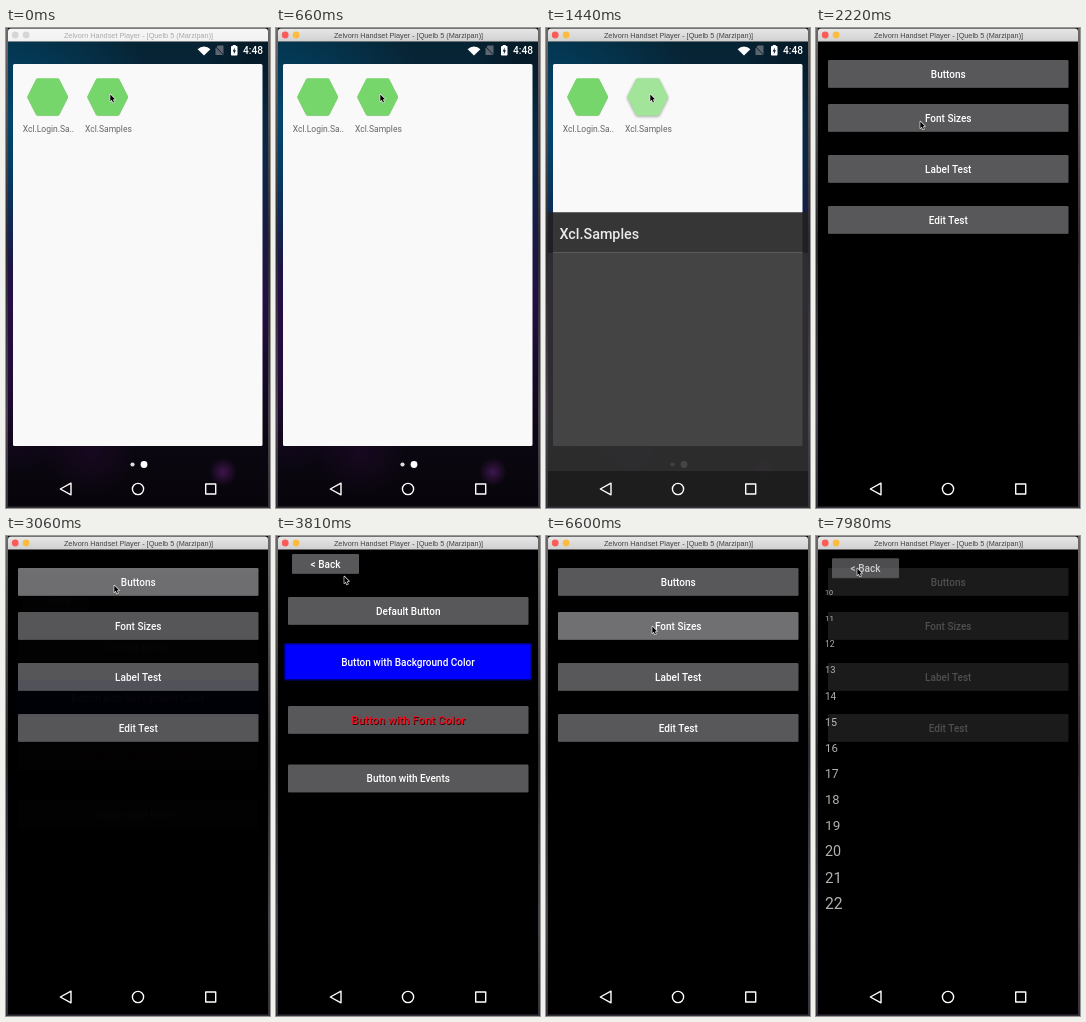
Animation of 264x480 px, one loop 8 s. Source, as an HTML page with a canvas:

```html
<!DOCTYPE html>
<html lang="en">
<head>
<meta charset="utf-8">
<title>App samples</title>
<style>
html, body { margin: 0; width: 100%; height: 100%; overflow: hidden; background: #000; }
canvas { display: block; width: 264px; height: 480px; }
</style>
</head>
<body>
<canvas id="stage"></canvas>
<script>
const LOOP = 8000, W = 264, H = 480;
const canvas = document.getElementById('stage');
const ratio = window.devicePixelRatio || 1;
canvas.width = W * ratio;
canvas.height = H * ratio;
const ctx = canvas.getContext('2d');
ctx.scale(ratio, ratio);

const clamp = v => Math.max(0, Math.min(1, v));
const progress = (t, start, duration) => clamp((t - start) / duration);
const easeOut = (p, power) => 1 - (1 - p) ** power;
const easeInOut = p => p * p * (3 - 2 * p);
const within = (t, start, end) => t >= start && t < end;

// Times of the main events
const FOCUS = 400, LAUNCH = 1378, APP_READY = 1880, ON_CLICK = 4560;
const presses = {
  icon: [1180, 1640], buttons: [2860, 3120], events: [4430, 4680],
  back: [5560, 5800], fonts: [6500, 6720], fontBack: [7700, 7990]
};
const visits = [
  { draw: drawButtonsPage, open: 3060, close: 5720 },
  { draw: drawFontsPage, open: 6640, close: 7835 }
];
// Pointer stops: time, x, y
const pointerPath = [
  [0, 104, 66], [1750, 104, 66], [2150, 104, 93], [2350, 104, 93], [2750, 108, 49],
  [3350, 108, 49], [3780, 68, 40], [3840, 68, 40], [4330, 108, 242], [4800, 108, 242],
  [5350, 53, 33], [5900, 53, 33], [6350, 106, 90], [6880, 106, 90], [7500, 41, 32], [8000, 41, 32]
];

function rect(x, y, w, h, fill, radius = 0) {
  ctx.fillStyle = fill;
  ctx.beginPath();
  ctx.roundRect(x, y, w, h, radius);
  ctx.fill();
}

function circle(x, y, r, fill) {
  ctx.fillStyle = fill;
  ctx.beginPath();
  ctx.arc(x, y, r, 0, Math.PI * 2);
  ctx.fill();
}

function polygon(points, fill) {
  ctx.beginPath();
  points.forEach(([x, y]) => ctx.lineTo(x, y));
  ctx.closePath();
  if (fill) {
    ctx.fillStyle = fill;
    ctx.fill();
  }
}

function text(label, x, y, size, { color = '#fff', weight = 500, align = 'center', family = 'Roboto' } = {}) {
  ctx.font = `${weight} ${size}px ${family}, sans-serif`;
  ctx.fillStyle = color;
  ctx.textAlign = align;
  ctx.textBaseline = 'alphabetic';
  ctx.fillText(label, x, y + size * 0.36);
}

function verticalGradient(top, bottom, stops) {
  const g = ctx.createLinearGradient(0, top, 0, bottom);
  stops.forEach(([at, color]) => g.addColorStop(at, color));
  return g;
}

function glow(x, y, r, rgb, alpha) {
  const g = ctx.createRadialGradient(x, y, 0, x, y, r);
  g.addColorStop(0, `rgba(${rgb},${alpha})`);
  g.addColorStop(1, `rgba(${rgb},0)`);
  ctx.fillStyle = g;
  ctx.fillRect(0, 0, W, H);
}

function layer(alpha, shift, draw) {
  ctx.save();
  ctx.globalAlpha = alpha;
  ctx.translate(0, shift);
  draw();
  ctx.restore();
}

function drawWallpaper() {
  ctx.fillStyle = verticalGradient(14, H, [
    [0, '#062433'], [0.25, '#0b2747'], [0.55, '#220f45'], [0.85, '#0b0712'], [1, '#07050a']
  ]);
  ctx.fillRect(0, 0, W, H);
  glow(0, 90, 150, '0,82,125', 0.75);
  glow(0, 340, 110, '50,12,80', 0.5);
  glow(250, 25, 60, '0,8,18', 0.4);
  glow(85, 425, 45, '55,12,68', 0.3);
  glow(217, 444, 14, '90,30,110', 0.65);
}

function drawStatusBar() {
  ctx.fillStyle = '#fff';
  ctx.beginPath();
  ctx.moveTo(198, 27.5);
  ctx.arc(198, 27.5, 9, -Math.PI * 0.75, -Math.PI * 0.25);
  ctx.fill();
  polygon([[209.5, 20], [212, 17.5], [217.5, 17.5], [217.5, 27], [209.5, 27]], '#5c6670');
  ctx.strokeStyle = '#15202a';
  ctx.lineWidth = 1;
  ctx.beginPath();
  ctx.moveTo(208.5, 17.5);
  ctx.lineTo(218, 27.5);
  ctx.stroke();
  rect(225, 18, 6.5, 9.5, '#fff', 0.8);
  rect(226.8, 17, 3, 2, '#fff');
  polygon([[228.8, 19.5], [226.6, 23.5], [228, 23.5], [227.8, 26.3], [230, 22.3], [228.6, 22.3]], '#102030');
  text('4:48', 257, 22.8, 10.2, { align: 'right' });
}

function drawIcon(x, label, pressed) {
  const color = pressed ? '#a2e49a' : '#77d66b';
  ctx.save();
  ctx.lineJoin = 'round';
  ctx.lineWidth = 3;
  ctx.strokeStyle = color;
  ctx.shadowColor = `rgba(0,0,0,${pressed ? 0.4 : 0.2})`;
  ctx.shadowBlur = (pressed ? 3 : 1) * ratio;
  ctx.shadowOffsetY = (pressed ? 1 : 0.5) * ratio;
  polygon([[-20, 0], [-11, -18], [11, -18], [20, 0], [11, 18], [-11, 18]]
    .map(([dx, dy]) => [x + dx * 0.94, 69 + dy * 0.94]));
  ctx.stroke();
  ctx.shadowColor = 'transparent';
  ctx.stroke();
  ctx.fillStyle = color;
  ctx.fill();
  ctx.restore();
  text(label, x + 0.7, 100.5, 8.5, { color: '#666', weight: 400 });
}

function drawLauncher(t) {
  drawWallpaper();
  drawStatusBar();
  rect(7, 36, 249.5, 382, '#f9f9f9', 1.5);
  drawIcon(41.7, 'Xcl.Login.Sa..', false);
  drawIcon(101.7, 'Xcl.Samples', within(t, ...presses.icon));
  circle(126.5, 436.5, 2.1, '#ddd');
  circle(138, 436.5, 3.4, '#fff');
}

function drawLaunchWindow(t) {
  const top = 443 - 411 * easeOut(progress(t, LAUNCH, 350), 5);
  const alpha = easeOut(progress(t, LAUNCH, 145), 4);
  layer(alpha, top, () => {
    rect(0, 0, W, 40.5, '#212121');
    rect(0, 40.5, W, H, '#303030');
    text('Xcl.Samples', 13.5, 21, 14.3, { align: 'left' });
  });
  layer(alpha, 0, () => rect(0, 443, W, 37, '#1c1c1c'));
}

function drawNavBar() {
  ctx.strokeStyle = '#fff';
  ctx.lineWidth = 1.4;
  ctx.lineJoin = 'round';
  polygon([[54.3, 461], [65, 455.2], [65, 466.8]]);
  ctx.stroke();
  ctx.beginPath();
  ctx.arc(132, 461, 5.6, 0, Math.PI * 2);
  ctx.stroke();
  ctx.strokeRect(199.7, 456, 10, 10);
}

function button(label, x, y, w, h, pressed) {
  rect(x, y, w, h, pressed ? '#707072' : '#58585a', 1.2);
  rect(x + 1, y + h - 0.6, w - 2, 0.6, 'rgba(0,0,0,.3)');
  if (label) text(label, x + w / 2, y + h / 2, 10);
}

const wideButton = (label, y, pressed) => button(label, 12, y, 240.5, 28, pressed);
const backButton = pressed => button('< Back', 16, 18, 67, 20, pressed);

function drawMainPage(t) {
  rect(0, 0, W, H, '#000');
  wideButton('Buttons', 32, within(t, ...presses.buttons));
  wideButton('Font Sizes', 76, within(t, ...presses.fonts));
  wideButton('Label Test', 127, false);
  wideButton('Edit Test', 178, false);
}

function drawButtonsPage(t) {
  rect(0, 0, W, H, '#000');
  backButton(within(t, ...presses.back));
  wideButton('Default Button', 61, false);
  rect(8, 107, 248, 37.5, '#000078', 1);
  rect(9.5, 108.5, 245, 34.5, '#00f');
  text('Button with Background Color', 132, 126.3, 10);
  wideButton('', 170, false);
  text('Button with Font Color', 133, 185, 11.4, { color: '#300' });
  text('Button with Font Color', 132.3, 184.3, 11.4, { color: '#f01020' });
  wideButton(t < ON_CLICK ? 'Button with Events' : 'OnClick!', 228.5, within(t, ...presses.events));
}

function drawFontsPage(t) {
  rect(0, 0, W, H, '#000');
  backButton(within(t, ...presses.fontBack));
  for (let size = 10; size <= 22; size++) {
    text(size, 9, 52 + 25.9 * (size - 10), size * 0.715, { align: 'left', weight: 400 });
  }
}

function drawApp(t) {
  drawMainPage(t);
  for (const { draw, open, close } of visits) {
    if (!within(t, open, close + 250)) continue;
    const leaving = progress(t, close, 250);
    const alpha = easeOut(progress(t, open, 200), 4) * (1 - progress(t, close + 100, 150));
    const shift = 37 * ((1 - progress(t, open, 350)) ** 5 + leaving ** 4);
    layer(alpha, shift, () => draw(t));
  }
}

function drawFrame(t) {
  const active = t >= FOCUS;
  ctx.fillStyle = verticalGradient(0, H, [
    [0, '#6e686a'], [0.45, '#2c282d'], [0.8, '#4b4450'], [1, '#353039']
  ]);
  ctx.fillRect(0, 0, 2, H);
  ctx.fillRect(262, 0, 2, H);
  ctx.fillRect(0, 478.5, W, 1.5);

  const bar = verticalGradient(0, 14, active
    ? [[0, '#e8e8e8'], [1, '#cfcfcf']]
    : [[0, '#f7f7f7'], [1, '#f1f1f1']]);
  rect(2, 0.5, 260, 13, bar, [3, 3, 0, 0]);
  const lights = active ? ['#fc5b57', '#fdbc40'] : ['#d6d6d6', '#d6d6d6'];
  lights.forEach((color, i) => circle(9.2 + 10.9 * i, 7, 3.4, color));
  text('Zelvorn Handset Player - [Quelb 5 (Marzipan)]', 132.5, 7, 7.3,
    { color: active ? '#444' : '#aaa', weight: 400, family: 'Liberation Sans' });
}

function drawPointer(t) {
  const next = Math.max(1, pointerPath.findIndex(stop => stop[0] > t));
  const [t0, x0, y0] = pointerPath[next - 1], [t1, x1, y1] = pointerPath[next];
  const p = easeInOut((t - t0) / (t1 - t0));
  ctx.save();
  ctx.translate(x0 + (x1 - x0) * p, y0 + (y1 - y0) * p);
  ctx.lineWidth = 1.3;
  ctx.lineJoin = 'round';
  ctx.strokeStyle = '#eee';
  polygon([[0.3, 0.5], [0.3, 7.2], [1.8, 5.8], [2.9, 8.5], [4, 8], [2.9, 5.4], [5, 5.3]]);
  ctx.stroke();
  ctx.fillStyle = '#000';
  ctx.fill();
  ctx.restore();
}

function render(t) {
  ctx.fillStyle = '#000';
  ctx.fillRect(0, 0, W, H);
  ctx.save();
  ctx.beginPath();
  ctx.rect(2, 13.5, 260, 465);
  ctx.clip();
  const ready = progress(t, APP_READY, 150);
  if (ready < 1) {
    drawLauncher(t);
    if (t >= LAUNCH) drawLaunchWindow(t);
    layer(progress(t, LAUNCH + 250, 150), 0, () => rect(0, 13, W, 19, '#000'));
    if (t >= LAUNCH + 250) drawStatusBar();
  }
  if (ready > 0) layer(ready, 0, () => drawApp(t));
  drawNavBar();
  ctx.restore();
  drawFrame(t);
  drawPointer(t);
}

const startTime = performance.now();
function tick() {
  render((performance.now() - startTime) % LOOP);
  requestAnimationFrame(tick);
}
tick();
</script>
</body>
</html>
```
